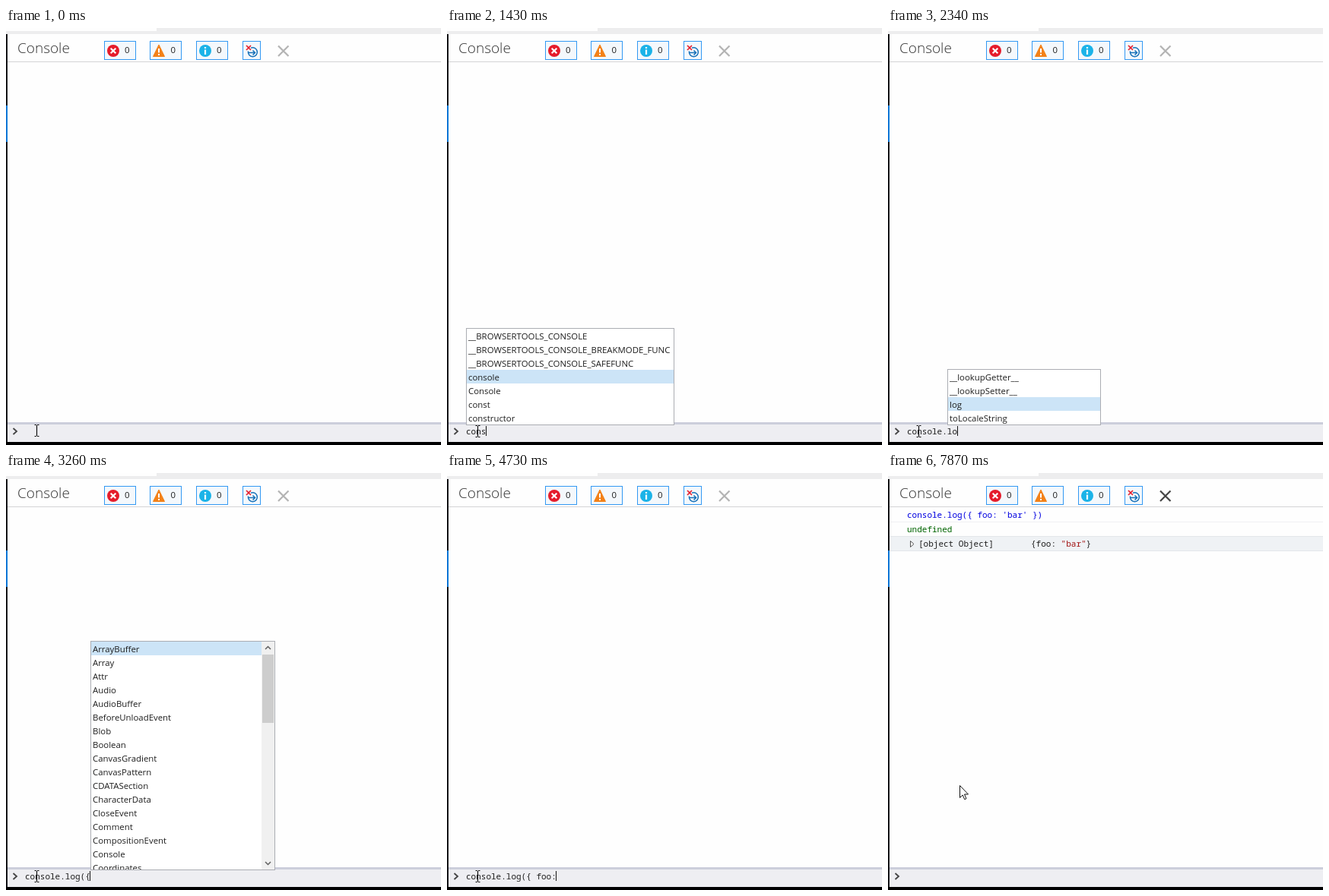
An HTML page for the animation above (7.99 s loop, 572x549 px).

```html
<!DOCTYPE html>
<html lang="en">
<head>
<meta charset="utf-8">
<title>Console typing</title>
<style>
  html, body { margin: 0; width: 100%; height: 100%; overflow: hidden; background: #fefefe; }
  svg { display: block; width: 572px; height: 549px; }
  text { white-space: pre; }
  .ui { font: 11.4px "Open Sans", "Noto Sans", sans-serif; fill: #1e1e1e; }
  .mono { font: 11px "Noto Sans Mono", "DejaVu Sans Mono", monospace; fill: #1e1e1e; }
  .btn { fill: #f4f8fc; stroke: #3399f3; }
</style>
</head>
<body>
<svg viewBox="0 0 572 549">
  <defs>
    <clipPath id="list"><rect y="222" width="572" height="300"/></clipPath>
  </defs>
  <!-- window frame -->
  <rect width="572" height="549" fill="#fefefe"/>
  <path d="M198 0H572V8H0V4H198Z" fill="#ededee"/>
  <path d="M2 44.5H572" stroke="#d4d4d6"/>
  <rect y="8" width="2" height="541" fill="#17171a"/>
  <rect y="102" width="2" height="48" fill="#0078d7"/>
  <rect x="2" y="519" width="570" height="3" fill="#cccedb"/>
  <rect x="2" y="522" width="570" height="23" fill="#eeeef2"/>
  <rect y="545" width="572" height="4"/>
  <path d="M9.5 527L14 531L9.5 535" fill="none" stroke="#444" stroke-width="1.8"/>

  <!-- toolbar -->
  <text x="15" y="33" style="font:300 19px 'Open Sans','Noto Sans',sans-serif" fill="#333">Console</text>
  <g class="btn">
    <rect x="129.5" y="17.5" width="41" height="24"/>
    <rect x="189.5" y="17.5" width="41" height="24"/>
    <rect x="250.5" y="17.5" width="41" height="24"/>
    <rect x="311.5" y="17.5" width="23" height="24"/>
  </g>
  <g class="ui">
    <text x="156" y="33">0</text><text x="216.500" y="33">0</text><text x="277" y="33">0</text>
  </g>
  <circle cx="141" cy="30" r="8" fill="#e51c2b"/>
  <path d="M137.700 26.700l6.600 6.600m0-6.600l-6.600 6.600" stroke="#fff" stroke-width="2.200"/>
  <path d="M201 22L208.500 37.500H193.500Z" fill="#f38118" stroke="#f38118" stroke-linejoin="round"/>
  <path d="M201 27v5.500m0 1.500v2" stroke="#fff" stroke-width="2"/>
  <circle cx="262" cy="30" r="8" fill="#1bb3e8"/>
  <path d="M262 25v2m0 1.500v6.500" stroke="#fff" stroke-width="2.200"/>
  <path d="M318.500 30.500A6 6 0 1 0 322 26.200M319 32.500H327M324.500 29.500L327.500 32.500L324.500 35.500" fill="none" stroke="#1570b8" stroke-width="1.500"/>
  <path d="M316 23l6 6m0-6l-6 6" stroke="#e51c2b" stroke-width="1.700"/>
  <path id="clear" d="M358 23.500l13.500 13.500m0-13.500l-13.500 13.500" stroke-width="2.200"/>

  <!-- printed result -->
  <g id="echo" class="mono">
    <text x="25" y="59" style="fill:#0000e0">console.log({ foo: 'bar' })</text>
    <path d="M2 64.500H572" stroke="#f0f0f3"/>
  </g>
  <g id="result" class="mono">
    <text x="25" y="78" style="fill:#006400">undefined</text>
    <rect x="2" y="83" width="570" height="20" fill="#e3e6ea"/>
    <rect x="2" y="84" width="570" height="18" fill="#eff2f5"/>
    <path d="M29.500 89.500L34 93.500L29.500 97.500Z" fill="#fff" stroke="#555"/>
    <text x="40" y="97">[object Object]</text>
    <text x="188" y="97">{foo: <tspan fill="#a31515">"bar"</tspan>}</text>
  </g>

  <text id="input" class="mono" x="25" y="535"></text>
  <rect id="caret" y="524" width="1" height="13"/>
  <g id="popup"></g>
  <path id="beam" d="M-3 -7.500H-.5M.5 -7.500H3M0 -7V7M-3 7.500H-.5M.5 7.500H3" stroke="#111" stroke-width="1.200"/>
  <path id="arrow" d="M.5 .5V16.500L4.200 13L6.700 18.700L9 17.700L6.500 12H11.500Z" fill="#fff" stroke="#111"/>
</svg>
<script>
const LOOP = 7990, ROW = 18, CHAR = 6.6;
const LINE = "console.log({ foo: 'bar' })";
const $ = id => document.getElementById(id);
const words = s => s.split(' ');

// [time, characters typed]
const KEYS = [
  [0, 0], [860, 1], [1150, 2], [1280, 3], [1430, 4], [1550, 5], [1700, 6], [1820, 7],
  [1940, 8], [2220, 9], [2340, 10], [2640, 12], [3010, 13], [3990, 14], [4140, 15],
  [4450, 16], [4730, 18], [4870, 19], [5000, 20], [5140, 21], [5280, 22], [5420, 23],
  [5700, 24], [5820, 25], [5960, 26], [6370, 27], [6920, 0]
];

const tools = words('__BROWSERTOOLS_CONSOLE __BROWSERTOOLS_CONSOLE_BREAKMODE_FUNC __BROWSERTOOLS_CONSOLE_SAFEFUNC');
const withC = words('cancelAnimationFrame case catch class clearImmediate clearInterval clearTimeout clientInformation close closed confirm console Console const');
const withCo = words('confirm console Console const constructor continue decodeURIComponent encodeURIComponent CompositionEvent Coordinates frameElement innerContent scrollControl webContext');
const withCon = words('confirm console Console const constructor continue AudioContext CanvasRenderingContext2D IconEvent PageContent RangeControl ScreenContext SecondContent WebContext');
const members = words('__defineGetter__ __defineSetter__ __lookupGetter__ __lookupSetter__ assert clear constructor count debug dir dirxml error group groupCollapsed groupEnd hasOwnProperty info');
const withL = words('__lookupGetter__ __lookupSetter__ clear groupCollapsed log profile profileEnd propertyIsEnumerable select timelineEnd toLocaleString valueOf table assertLevel level logAll clearAll');
const globals = words('ArrayBuffer Array Attr Audio AudioBuffer BeforeUnloadEvent Blob Boolean CanvasGradient CanvasPattern CDATASection CharacterData CloseEvent Comment CompositionEvent Console Coordinates');
const withF = words('false finally focus for frameElement frames function File FileList FileReader Float32Array Float64Array FocusEvent FormData Function isFinite offscreenBuffering');
const withFo = words('focus for FocusEvent FormData clientInformation forEach performance Performance platform onfocus onfocusin onfocusout transform HTMLFormElement PerformanceEntry PerformanceMark PerformanceTiming');

// [start, end, left, width, selected row, items]
const POPUPS = [
  [1000, 1150, 25, 291, 3, [...tools, ...withC]],
  [1150, 1280, 25, 291, 4, [...tools, ...withCo]],
  [1280, 1430, 25, 291, 4, [...tools, ...withCon]],
  [1430, 1550, 25, 274, 3, [...tools, ...words('console Console const constructor')]],
  [1550, 1940, 25, 274, 3, [...tools, ...words('console Console')]],
  [1940, 2220, 78, 219, 0, members],
  [2220, 2340, 78, 219, 4, withL],
  [2340, 2640, 78, 202, 2, words('__lookupGetter__ __lookupSetter__ log toLocaleString')],
  [3260, 3560, 111, 243, 0, globals],
  [4300, 4450, 117, 219, 0, withF],
  [4450, 4730, 117, 219, 0, withFo]
];

const rect = (x, y, w, h, fill) => `<rect x="${x}" y="${y}" width="${w}" height="${h}" fill="${fill}"/>`;

function scrollbar(x) {
  return rect(x, 222, 17, 300, '#f0f0f0') + rect(x + 1, 239, 15, 90, '#cdcdcd') +
    `<path d="M${x + 5} 232l3.500 -3.500l3.500 3.500M${x + 5} 512l3.500 3.500l3.500 -3.500" fill="none" stroke="#606060" stroke-width="1.500"/>`;
}

function drawPopup([, , x, w, picked, items]) {
  const full = items.length * ROW, h = Math.min(full, 300), top = 522 - h;
  const rows = items.map((name, i) => {
    const y = top + i * ROW;
    return (i === picked ? rect(x + 1, y, w - 2, ROW, '#cce4f7') : '') +
      `<text class="ui" x="${x + 3}" y="${y + 14}">${name}</text>`;
  }).join('');
  return rect(x, top - 1, w, h + 2, '#abadb3') + rect(x + 1, top, w - 2, h, '#fff') +
    `<g clip-path="url(#list)">${rows}</g>` + (full > h ? scrollbar(x + w - 18) : '');
}

const show = (id, on) => $(id).setAttribute('visibility', on ? 'visible' : 'hidden');
const move = (id, x, y) => $(id).setAttribute('transform', `translate(${x} ${y})`);
let shown;

function render(t) {
  const typed = KEYS.filter(k => k[0] <= t).pop()[1];
  $('input').textContent = LINE.slice(0, typed);
  $('caret').setAttribute('x', Math.floor(25 + typed * CHAR));
  $('caret').setAttribute('fill', t >= 6770 ? '#a5a5a8' : '#111');
  show('caret', t >= 450 && t < 6920);

  const popup = POPUPS.find(p => t >= p[0] && t < p[1]);
  if (popup !== shown) {
    $('popup').innerHTML = popup ? drawPopup(popup) : '';
    shown = popup;
  }

  show('echo', t >= 6920);
  show('result', t >= 7040);
  $('clear').setAttribute('stroke', t >= 6920 ? '#444' : '#b3b3b3');

  // the pointer glides up in four ticks, slowing down
  const leaving = t >= 7470;
  const left = 1 - Math.min(4, Math.floor((t - 7470) / 133.3) + 1) / 4;
  show('beam', !leaving);
  show('arrow', leaving);
  move('beam', 40.5, t < 150 ? 530 : 531);
  move('arrow', Math.round(94 - 54 * left * left), Math.round(411 + 112 * left * left));
}

const start = performance.now();
function tick() {
  render((performance.now() - start) % LOOP);
  requestAnimationFrame(tick);
}
tick();
</script>
</body>
</html>
```
